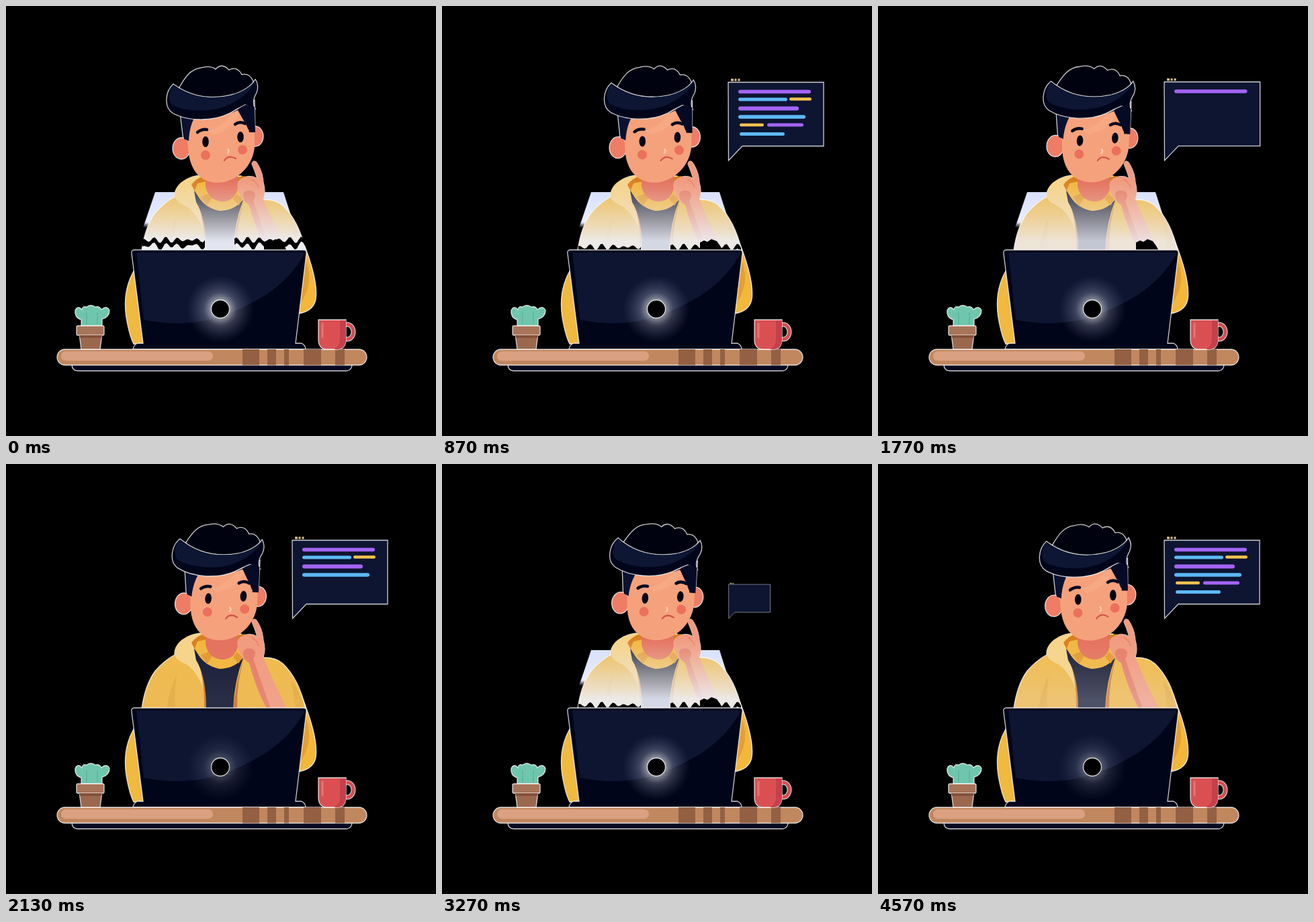
Write an HTML page that moves like this. It is 640 px wide and 640 px high and loops after 4760 ms.

```html
<!DOCTYPE html>
<html lang="en">
<head>
<meta charset="utf-8">
<title>Thinking at the desk</title>
<style>
html, body { margin: 0; width: 100%; height: 100%; overflow: hidden; background: #000; }
svg { display: block; width: 100%; height: 100%; }
.rim { stroke: #fff; stroke-width: 1.3; stroke-opacity: .8; }
</style>
</head>
<body>
<svg viewBox="0 0 640 640">
  <defs>
    <linearGradient id="haze" gradientUnits="userSpaceOnUse" x1="0" y1="258" x2="0" y2="350">
      <stop offset="0" stop-color="#e8dcc8" stop-opacity="0"/>
      <stop offset=".5" stop-color="#ece6de" stop-opacity=".5"/>
      <stop offset="1" stop-color="#edf0fa" stop-opacity=".95"/>
    </linearGradient>
    <linearGradient id="wing" gradientUnits="userSpaceOnUse" x1="0" y1="277" x2="0" y2="330">
      <stop offset="0" stop-color="#d9e1fb"/>
      <stop offset=".85" stop-color="#e9edff"/>
      <stop offset="1" stop-color="#e9edff" stop-opacity="0"/>
    </linearGradient>
    <linearGradient id="jacket" x1="0" y1="0" x2="0" y2="1">
      <stop offset="0" stop-color="#f1be4e"/>
      <stop offset="1" stop-color="#edb444"/>
    </linearGradient>
    <radialGradient id="glow">
      <stop offset=".25" stop-color="#fff" stop-opacity=".6"/>
      <stop offset=".5" stop-color="#c9cde0" stop-opacity=".28"/>
      <stop offset="1" stop-color="#8088b0" stop-opacity="0"/>
    </radialGradient>
    <path id="body" d="M202 364C205 343 211 323 222 308Q236 292 251 284C250 268 268 254 288 252L350 253L384 288Q402 288 412 297C429 313 440 338 446 364Z"/>
    <path id="hand" d="M346 275Q340 260 354 255Q365 251 374 257Q370 244 366 235Q368 228 373 233Q382 246 383 263Q387 276 383 287Q396 320 418 364H388Q371 331 362 296Q349 289 346 275Z"/>
    <clipPath id="torso"><use href="#body"/><use href="#hand"/></clipPath>
  </defs>

  <path id="wings" fill="url(#wing)" d="M222 277H413L430 330H204Z"/>
  <use href="#hand" class="rim"/>

  <!-- sleeves -->
  <path class="rim" fill="#f0b93f" d="M194 388C178 412 175 438 179 464Q184 492 190 503H208Z"/>
  <path class="rim" fill="#f3b73c" d="M440 345C452 375 465 412 461 437Q457 455 434 458Z"/>
  <path fill="#e5a033" d="M446 378Q457 405 445 431L438 444Z"/>

  <!-- torso -->
  <use href="#body" class="rim" fill="url(#jacket)"/>
  <path fill="#e4aa3d" d="M254 314Q243 337 239 364H252Q250 338 254 314ZM425 322Q438 340 443 364H431Z"/>
  <path fill="#f6d489" d="M251 284C249 267 267 254 290 252L284 272Q293 300 295 336Q284 308 268 298Q253 292 251 284Z"/>
  <path fill="#d97f20" d="M276 266Q284 255 297 253L300 268L283 280ZM341 255L356 253L350 272Z"/>
  <path fill="#c9752c" d="M281 280Q297 304 300 364H295Q296 316 281 280ZM355 286Q342 322 338 364H344Q343 325 355 286Z"/>
  <path fill="#161b35" d="M280 275Q298 300 320 300Q340 300 353 289Q340 322 338 364H298Q298 316 283 292Z"/>
  <path fill="#f2b63f" d="M285 264L299 261Q302 290 322 291Q339 288 344 272L352 288Q342 304 318 305Q292 300 281 274Z"/>
  <path fill="#e29a31" d="M290 284L302 279L307 286L299 298ZM344 280L352 288L346 297L338 287Z"/>
  <path fill="#e4725e" d="M297 250H345V272Q340 291 321 291Q301 289 297 268Z"/>

  <g id="head">
    <path class="rim" fill="#0b1231" d="M258 152H284L274 204L264 200ZM335 148L370 140L371 189H361Z"/>
    <ellipse class="rim" cx="261" cy="212" rx="13" ry="16" fill="#ee7d65"/>
    <ellipse class="rim" cx="371" cy="194" rx="12" ry="15" fill="#ee7d65"/>
    <path fill="#f5a27c" d="M272 170Q269 190 271 212C273 242 287 262 314 263C342 263 367 240 370 210V188L362 187L354 169L345 149H285Z"/>
    <path fill="#f8ae8a" opacity=".6" d="M302 186Q327 177 340 153L347 160Q340 183 309 192Z"/>
    <path fill="#0b1231" d="M260 155H288Q273 172 272 201L265 198Z"/>
    <path class="rim" fill="#00030f" d="M258 121C266 107 274 94 290 92Q304 88 312 94Q321 84 332 95Q344 89 351 102Q362 99 368 112L362 140L270 148Z"/>
    <path class="rim" fill="#01051a" d="M249 116C237 127 234 151 249 160C272 172 309 172 334 159Q349 150 356 147L371 153Q365 143 373 129Q377 118 371 109Q363 123 340 131Q289 145 249 116Z"/>
    <path fill="#0d1633" d="M248 118C242 128 241 140 247 147C270 160 315 158 338 144Q363 130 371 112Q358 127 335 133Q287 144 248 118Z"/>
    <path fill="#060b25" d="M334 160L357 147L370 150L371 188L362 188Q361 176 354 171L345 155Z"/>
    <g fill="none" stroke="#050a20" stroke-width="4.5" stroke-linecap="round">
      <path d="M285 188Q291 183 299 184"/>
      <path d="M341 176Q348 171 356 175"/>
    </g>
    <g fill="#050615">
      <ellipse cx="297" cy="202" rx="4.8" ry="8"/>
      <ellipse cx="349" cy="195" rx="4.8" ry="8"/>
    </g>
    <g fill="#ec705c">
      <circle cx="297" cy="222" r="7"/>
      <circle cx="352" cy="214" r="7"/>
    </g>
    <path d="M330 213Q333 216 330 219" fill="none" stroke="#fbd0b9" stroke-width="2" stroke-linecap="round"/>
    <path d="M325 230Q331 221 342 227" fill="none" stroke="#d0574a" stroke-width="2.2" stroke-linecap="round"/>
  </g>

  <!-- hand -->
  <use href="#hand" fill="#f19b80"/>
  <path fill="#e67d69" d="M353 279Q358 272 368 276Q374 281 368 290Q380 325 394 364H388Q371 331 362 296Q352 290 353 279Z"/>
  <path d="M366 258Q375 264 376 271" fill="none" stroke="#e67d69" stroke-width="1.5"/>

  <g clip-path="url(#torso)">
    <rect id="light" x="190" y="258" width="260" height="106" fill="url(#haze)"/>
  </g>
  <path id="gap"/>
  <path id="armGap" d="M384 366V352L390 349L395 351L401 347L409 350L414 357L419 366Z"/>

  <!-- laptop -->
  <path class="rim" fill="#01051a" d="M191 363H443Q448 363 447 369L431 502H440Q446 505 446 511H189Q190 504 196 502H204L187 369Q186 363 191 363Z"/>
  <path fill="#0d1531" d="M194 367H445Q425 405 385 431Q320 471 262 472Q234 473 205 467Z"/>
  <circle id="halo" cx="319" cy="451" r="50" fill="url(#glow)"/>
  <circle class="rim" cx="319" cy="451" r="13.5"/>

  <!-- desk -->
  <path class="rim" fill="#060a20" d="M98 533H515Q515 543 506 543H107Q98 543 98 533Z"/>
  <rect class="rim" x="76" y="511" width="461" height="23.5" rx="11.7" fill="#c1875f"/>
  <rect x="82" y="514" width="226" height="14" rx="7" fill="#d9a180"/>
  <path fill="#936044" d="M352 511h25v23.5h-25zM389 511h13v23.5h-13zM414 511h7v23.5h-7zM443 511h26v23.5h-26zM490 511h14v23.5h-14z"/>

  <!-- cactus -->
  <path class="rim" fill="#70c6ad" d="M112 476V467Q102 464 103 453Q107 445 113 452Q114 446 120 448Q126 443 133 448Q139 446 142 452Q150 445 154 453Q154 463 143 466V476Z"/>
  <path d="M120 456V474M136 456V474" stroke="#5db8a2" stroke-width="1.8"/>
  <path class="rim" fill="#9b684e" d="M109 488H143L140 511H112Z"/>
  <rect class="rim" x="105" y="476" width="41" height="14" rx="2" fill="#a87459"/>
  <path fill="#835039" d="M109 490H143L142 494H110Z"/>

  <!-- mug -->
  <ellipse cx="508" cy="485" rx="9" ry="11" fill="none" stroke="#fff" stroke-opacity=".8" stroke-width="7"/>
  <ellipse cx="508" cy="485" rx="9" ry="11" fill="none" stroke="#d64c50" stroke-width="4.5"/>
  <path class="rim" fill="#da5052" d="M465 467H506V498Q505 510 495 511H476Q466 510 465 498Z"/>
  <path fill="#c5404a" d="M497 468H506V498Q505 509 495 511H488Q497 507 497 495Z"/>
  <path d="M471 473V493" stroke="#e87470" stroke-width="3" stroke-linecap="round"/>

  <g id="bubble">
    <path class="rim" fill="#0d1531" d="M426 113.5H568V208.500H447L426.500 230Z"/>
    <path d="M430 110h4M435.500 110h3M440.500 110h3" stroke="#d8c08c" stroke-width="3.500"/>
    <g id="code"></g>
  </g>
</svg>
<script>
const LOOP = 4760, LAST = 4570, CYCLE = 1600, PULSE = 800;
const $ = id => document.getElementById(id);
const clamp = v => Math.max(0, Math.min(1, v));

// time, value
const sway = [[0, 0], [870, .24], [1430, .55], [2130, .77], [2670, .92], [3250, 1], [3830, 1], [4570, .14]];
const shine = [[0, 1], [270, .76], [520, .04], [630, .54], [800, 1]];
const pop = [[0, 0], [35, 0], [120, 1.03], [180, 1]];

// row, x, end, y, height, colour
const P = '#a364f3', B = '#5db9f5', Y = '#f2c14e';
const parts = [
  [0, 441, 549, 127.500, 5.500, P],
  [1, 441, 514, 139, 5, B], [1, 517, 550, 138.500, 4.500, Y],
  [2, 441, 531, 152.500, 6, P],
  [3, 441, 541, 165, 5.500, B],
  [4, 443, 479, 177, 4.500, Y], [4, 484, 538, 177, 5, P],
  [5, 443, 510, 190.500, 5, B]
];
const bars = parts.map(([row, x, end, y, height, fill]) => {
  const bar = document.createElementNS('http://www.w3.org/2000/svg', 'rect');
  const set = { x, y: y - height / 2, width: end - x, height, rx: height / 2, fill };
  for (const k in set) bar.setAttribute(k, set[k]);
  return { row, bar: $('code').appendChild(bar) };
});

// ragged dark band either side of the shirt
function band(from, to) {
  let top = '', bottom = '';
  for (let x = from; x <= to; x += 3) {
    const y = 348 + 3 * Math.sin(x * 1.7) + 2 * Math.sin(x * .31);
    top += `L${x} ${y}`;
    bottom = `L${x} ${y + 9 + 2 * Math.sin(x * 2.3)}` + bottom;
  }
  return 'M' + (top + bottom).slice(1) + 'Z';
}
$('gap').setAttribute('d', band(203, 297) + band(340, 446));

function at(keys, t) {
  const i = keys.findIndex(k => k[0] > t);
  if (i < 0) return keys[keys.length - 1][1];
  const [t0, a] = keys[i - 1], [t1, b] = keys[i];
  return a + (b - a) * (t - t0) / (t1 - t0);
}

function draw(time) {
  const t = Math.min(time % LOOP, LAST), c = t % CYCLE;
  const g = at(shine, t % PULSE), s = at(pop, c);

  $('head').setAttribute('transform', `rotate(${5 * at(sway, t)} 325 262)`);
  $('light').setAttribute('opacity', g);
  $('wings').setAttribute('opacity', clamp((g - .5) / .2));
  $('halo').setAttribute('opacity', .35 + .65 * g);
  $('gap').setAttribute('transform', `translate(0 ${20 * clamp((1 - g) / .12)})`);
  $('armGap').setAttribute('transform', `translate(0 ${20 * clamp((.76 - g) / .28)})`);
  $('bubble').setAttribute('transform', `translate(427 230) scale(${s}) translate(-427 -230)`);
  $('bubble').style.display = s > 0 ? '' : 'none';
  for (const { row, bar } of bars) bar.style.display = c >= 90 + row * 140 ? '' : 'none';
}

const start = performance.now();
function tick() {
  draw(performance.now() - start);
  requestAnimationFrame(tick);
}
tick();
</script>
</body>
</html>
```
